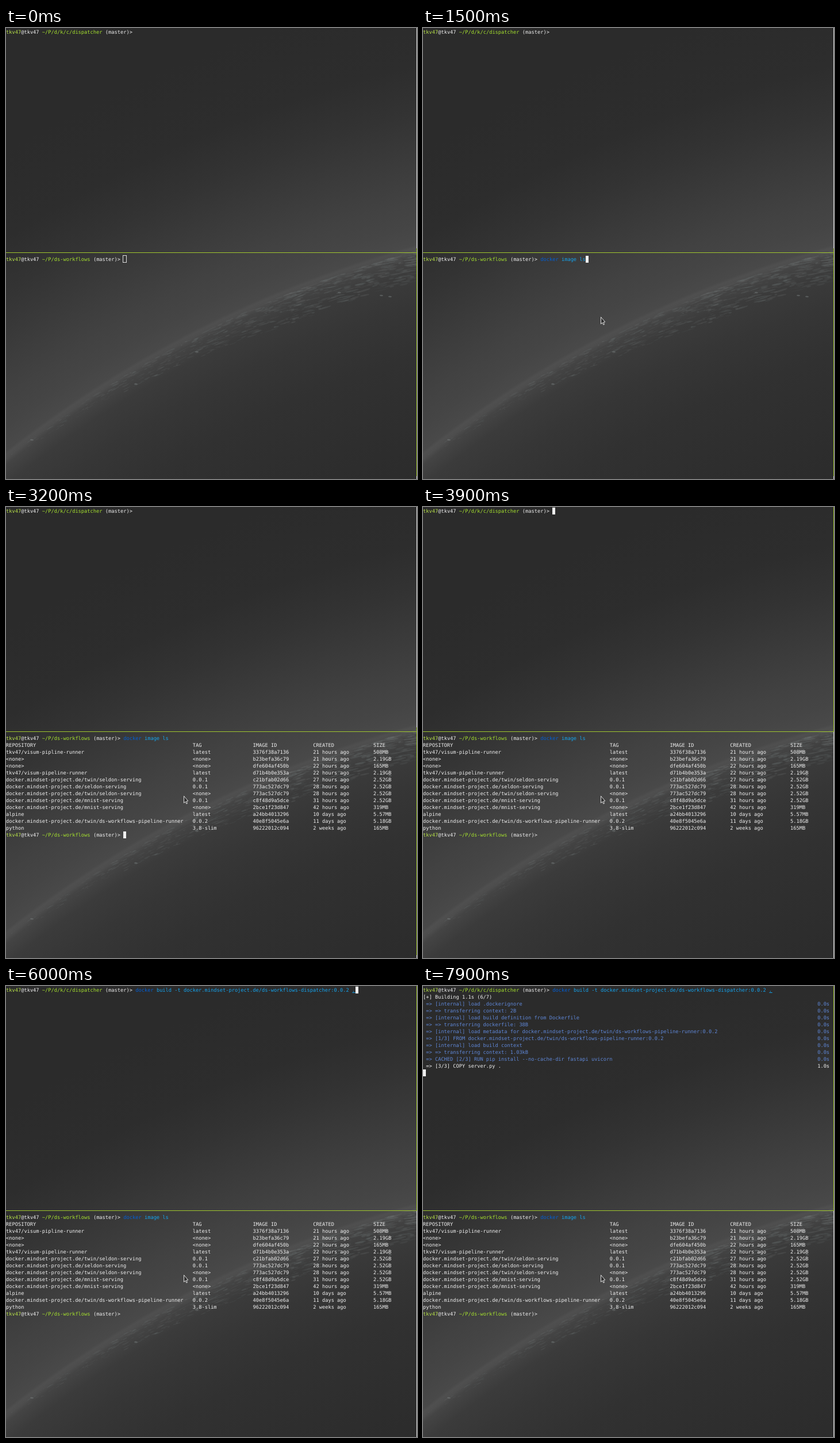
Write an HTML page with a canvas that moves like this. It is 715x784 px and loops after 8000 ms.

```html
<!DOCTYPE html>
<html lang="en">
<head>
<meta charset="utf-8">
<title>Split terminal</title>
<style>
  html, body { margin: 0; width: 100%; height: 100%; overflow: hidden; background: #2b2b2b; }
  canvas { display: block; width: 715px; height: 784px; }
</style>
</head>
<body>
<canvas id="stage" width="715" height="784"></canvas>
<script>
const W = 715, H = 784, LOOP = 8000;
const CELL = 5.238, LINE = 12, LOWER = 395;
const WHITE = '#f0f0f0', GREEN = '#a6e22e', USER = '#b9e34a', BLUE = '#5f87d7';
const CMD = '#005fd7', ARG = '#14a5f0', PARTIAL = '#b35f1e', HINT = '#585858';
const RULE = '#9fc52e', IDLE = '#dcdcdc';
const ctx = document.getElementById('stage').getContext('2d');

const USERNAME = 'tkv47';
const HOST = 'docker.mindset-project.de/';
const RUNNER = HOST + 'twin/ds-workflows-pipeline-runner';
const TARGET = HOST + 'ds-workflows-dispatcher:0.0.2';
const LIST = 'docker image ls';
const PUSH = 'docker push ' + TARGET;
const BUILD = 'docker build -t ' + TARGET + ' .';

const IMAGES = [
  'REPOSITORY|TAG|IMAGE ID|CREATED|SIZE',
  USERNAME + '/visum-pipline-runner|latest|3376f38a7136|21 hours ago|508MB',
  '<none>|<none>|b23befa36c79|21 hours ago|2.19GB',
  '<none>|<none>|dfe604af450b|22 hours ago|165MB',
  USERNAME + '/visum-pipeline-runner|latest|d71b4b0e353a|22 hours ago|2.19GB',
  HOST + 'twin/seldon-serving|0.0.1|c21bfab02d66|27 hours ago|2.52GB',
  HOST + 'seldon-serving|0.0.1|773ac527dc79|28 hours ago|2.52GB',
  HOST + 'twin/seldon-serving|<none>|773ac527dc79|28 hours ago|2.52GB',
  HOST + 'mnist-serving|0.0.1|c8f48d9a5dce|31 hours ago|2.52GB',
  HOST + 'mnist-serving|<none>|2bce1f23d847|42 hours ago|319MB',
  'alpine|latest|a24bb4013296|10 days ago|5.57MB',
  RUNNER + '|0.0.2|40e8f5045e6a|11 days ago|5.18GB',
  'python|3.8-slim|96222012c094|2 weeks ago|165MB'
].map(row => row.split('|'));
const COLS = [0, 62, 82, 102, 122];

const STEPS = [
  '[internal] load .dockerignore',
  '=> transferring context: 2B',
  '[internal] load build definition from Dockerfile',
  '=> transferring dockerfile: 38B',
  '[internal] load metadata for ' + RUNNER + ':0.0.2',
  '[1/3] FROM ' + RUNNER + ':0.0.2',
  '[internal] load build context',
  '=> transferring context: 1.03kB',
  'CACHED [2/3] RUN pip install --no-cache-dir fastapi uvicorn',
  '[3/3] COPY server.py .'
];

// Planet limb: one large circle reaching in from the lower right.
const EARTH = { x: 1226.5, y: 2288, r: 1972 };

function paintBackdrop() {
  const canvas = document.createElement('canvas');
  canvas.width = W;
  canvas.height = H;
  const g = canvas.getContext('2d');
  const inner = EARTH.r - 400, span = 840;
  const sky = g.createRadialGradient(EARTH.x, EARTH.y, inner, EARTH.x, EARTH.y, inner + span);
  const shades = [[-400, 43], [-180, 49], [-95, 54], [-40, 59], [-12, 68], [-4, 77], [2, 79], [7, 73],
                  [40, 69], [80, 66], [150, 59], [230, 51], [310, 45], [440, 43]];
  for (const [d, v] of shades) sky.addColorStop((d + 400) / span, `rgb(${v},${v},${v})`);
  g.fillStyle = sky;
  g.fillRect(0, 0, W, H);

  let seed = 11;
  const rnd = () => (seed = seed * 16807 % 2147483647) / 2147483647;
  const streak = (x, depth, len, thick, alpha) => {
    const r = EARTH.r - depth;
    const y = EARTH.y - Math.sqrt(r * r - (EARTH.x - x) ** 2);
    const tilt = -Math.atan2(EARTH.x - x, EARTH.y - y) + rnd() * 0.2;
    g.fillStyle = `rgba(124,132,132,${alpha})`;
    g.beginPath();
    g.ellipse(x, y, len, thick, tilt, 0, 7);
    g.fill();
  };
  for (let i = 0; i < 850; i++) {
    const x = 725 * Math.pow(rnd(), 0.62);
    const reach = 5 + Math.min(x, 500) * 0.09;
    const size = 0.4 + x / 900;
    streak(x, 4 + reach * Math.pow(rnd(), 1.5), (2 + rnd() * 10) * size, (0.4 + rnd() * 1.1) * size, 0.05 + rnd() * 0.14);
  }
  for (const [x, y] of [[580, 460], [653, 465], [668, 467], [332, 563], [45, 716], [226, 619]]) {
    g.fillStyle = 'rgba(135,143,143,.4)';
    g.beginPath();
    g.ellipse(x, y, 3, 1.3, 0.1, 0, 7);
    g.fill();
  }
  return canvas;
}
const backdrop = paintBackdrop();

function put(str, col, row, top, color) {
  ctx.fillStyle = color;
  ctx.fillText(str, col * CELL, top + row * LINE + 10);
}

function block(col, row, top, color = WHITE) {
  ctx.fillStyle = color;
  ctx.fillRect(Math.round(col * CELL), top + row * LINE + 1, 5, LINE);
}

// Draws the shell prompt and returns the column where input starts.
function prompt(path, row, top) {
  put(USERNAME, 0, row, top, USER);
  put('@' + USERNAME, 5, row, top, WHITE);
  put(path, 12, row, top, GREEN);
  put('(master)>', 13 + path.length, row, top, WHITE);
  return 23 + path.length;
}

// Typed text, followed by the dim completion from the shell history.
function input(full, count, col, top, cursor) {
  const typed = full.slice(0, count);
  put(typed.slice(0, 6), col, 0, top, count < 6 ? PARTIAL : CMD);
  if (count > 7) put(typed.slice(7), col + 7, 0, top, ARG);
  if (count && count < full.length) put(full.slice(count), col + count, 0, top, HINT);
  if (count === BUILD.length) {
    ctx.fillStyle = ARG;
    ctx.fillRect((col + count - 1) * CELL, top + 11, CELL, 1);
  }
  if (!cursor) return;
  const hinted = count && count < full.length;
  block(col + count, 0, top, hinted ? '#808080' : WHITE);
  if (hinted) put(full[count], col + count, 0, top, '#3a3a3a');
}

function upperPane(t) {
  const col = prompt('~/P/d/k/c/dispatcher', 0, 0);
  if (t < 3500) return;
  const keys = t < 4500 ? 0 : Math.min(9, Math.floor((t - 4500) / 100) + 1);
  const full = keys < 8 ? PUSH : BUILD;
  input(full, t < 6000 ? keys : BUILD.length, col, 0, t < 6800);
  if (t < 6800) return;
  if (t < 6900) return block(0, 1, 0);

  const tenths = Math.floor((t - 6800) / 100);
  const secs = n => (n / 10).toFixed(1) + 's';
  put(`[+] Building ${secs(tenths)} (6/7)`, 0, 1, 0, WHITE);
  STEPS.forEach((step, i) => {
    const running = i === STEPS.length - 1;
    const color = running ? WHITE : BLUE;
    put('=> ' + step, 1, i + 2, 0, color);
    put(secs(running ? tenths - 1 : 0), 131, i + 2, 0, color);
  });
  block(0, 12, 0);
}

function lowerPane(t) {
  const path = '~/P/ds-workflows';
  const col = prompt(path, 0, LOWER);
  if (t < 800) {
    ctx.strokeStyle = IDLE;
    ctx.lineWidth = 1;
    ctx.strokeRect(203.5, LOWER + 0.5, 6, 12);
    return;
  }
  const keys = t < 1000 ? 0 : Math.floor((t - 1000) / 100) + 1;
  input(LIST, t < 1500 ? keys : LIST.length, col, LOWER, t < 2600);
  if (t < 2600) return;
  IMAGES.forEach((row, i) => row.forEach((cell, c) => put(cell, COLS[c], i + 1, LOWER, WHITE)));
  if (t < 2700) return block(0, 14, LOWER);
  prompt(path, 14, LOWER);
  if (t < 3500) block(col, 14, LOWER);
}

// Divider and side border; the active pane has the green side.
function borders(t) {
  const upperActive = t >= 3500;
  const bar = (color, x, y, w, h) => {
    ctx.fillStyle = color;
    ctx.fillRect(x, y, w, h);
  };
  bar(RULE, 0, 390, W, 1);
  bar(IDLE, 714, 0, 1, H);
  if (upperActive) bar(RULE, 714, 0, 1, 391);
  else bar(RULE, 714, 383, 1, 396);
}

function pointer(t) {
  if (t < 100) return;
  const left = Math.pow(1 - Math.min(1, (t - 100) / 700), 2);
  ctx.save();
  ctx.translate(309.5 + 400 * left, 502.5 - 30 * left);
  ctx.beginPath();
  for (const [x, y] of [[0, 0], [0, 12], [2.6, 9.7], [4.4, 13.5], [6, 12.7], [4.3, 9], [7.3, 8.5]]) ctx.lineTo(x, y);
  ctx.closePath();
  ctx.fillStyle = '#303030';
  ctx.strokeStyle = WHITE;
  ctx.lineWidth = 0.9;
  ctx.fill();
  ctx.stroke();
  ctx.restore();
}

function draw(now) {
  const t = now % LOOP;
  ctx.drawImage(backdrop, 0, 0);
  ctx.font = '8.7px "DejaVu Sans Mono", monospace';
  ctx.textRendering = 'geometricPrecision';
  borders(t);
  upperPane(t);
  lowerPane(t);
  pointer(t);
}

let start;
function tick(now) {
  start ??= now;
  draw(now - start);
  requestAnimationFrame(tick);
}
requestAnimationFrame(tick);
</script>
</body>
</html>
```
